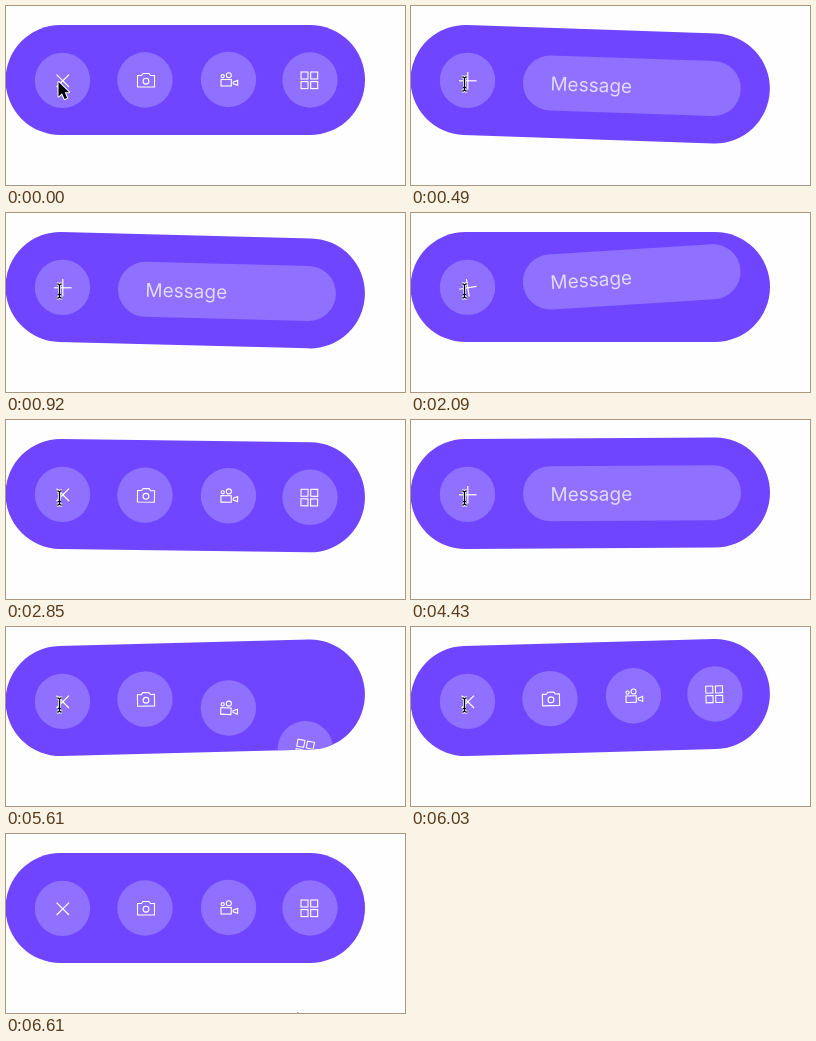
These frames come from a looping animation (399 by 179 pixels, 7030 ms). An HTML page with a canvas:

```html
<!DOCTYPE html>
<html lang="en">
<head>
<meta charset="utf-8">
<title>Swinging message bar</title>
<style>
html, body { margin: 0; width: 100%; height: 100%; overflow: hidden; background: #fefefe; }
canvas { display: block; width: 399px; height: 179px; }
</style>
</head>
<body>
<canvas id="stage"></canvas>
<script>
const W = 399, H = 179, LOOP = 7030;
const PIVOT = { x: 56, y: 74 };
const canvas = document.getElementById('stage');
const ctx = canvas.getContext('2d');
const dpr = window.devicePixelRatio || 1;
canvas.width = W * dpr;
canvas.height = H * dpr;

// Swing of the bar: [ms since click, degrees]
const HIT_DOWN = [[150, 0], [270, 5.1], [440, -3.8], [640, 1.5], [830, -1.1], [980, 0.25], [1100, 0]];
const HIT_UP = [[150, 0], [440, -5.5], [860, 1.2], [1010, -0.5], [1130, 0]];

const CLICKS = [
  { at: 290, menu: false },
  { at: 2060, menu: true },
  { at: 3670, menu: false },
  { at: 5360, menu: true }
];

const clamp = v => Math.max(0, Math.min(1, v));
const smooth = p => (1 - Math.cos(Math.PI * clamp(p))) / 2;

function swing(keys, t) {
  if (t <= keys[0][0]) return 0;
  for (let i = 1; i < keys.length; i++) {
    const [t0, a] = keys[i - 1], [t1, b] = keys[i];
    if (t < t1) return a + (b - a) * smooth((t - t0) / (t1 - t0));
  }
  return 0;
}

function turn(deg, draw, x = PIVOT.x, y = PIVOT.y) {
  ctx.save();
  ctx.translate(x, y);
  ctx.rotate(deg * Math.PI / 180);
  ctx.translate(-x, -y);
  draw();
  ctx.restore();
}

function pill(x, y, w, h) {
  ctx.beginPath();
  ctx.roundRect(x, y, w, h, h / 2);
}

function disc(x, y) {
  ctx.fillStyle = '#8f70ff';
  ctx.beginPath();
  ctx.arc(x, y, 27.7, 0, Math.PI * 2);
  ctx.fill();
}

function line(points, close) {
  ctx.beginPath();
  points.forEach(([x, y]) => ctx.lineTo(x, y));
  if (close) ctx.closePath();
  ctx.stroke();
}

function ring(x, y, r) {
  ctx.beginPath();
  ctx.arc(x, y, r, 0, Math.PI * 2);
  ctx.stroke();
}

function camera() {
  line([[131.5, 69.5], [135.5, 69.5], [137, 67.5], [143, 67.5], [144.5, 69.5],
        [148.5, 69.5], [148.5, 81], [131.5, 81]], true);
  ring(140, 75.2, 2.9);
}

function video() {
  ring(216.7, 70.2, 1.6);
  ring(222.8, 69.2, 2.5);
  ctx.strokeRect(215, 73.5, 10.3, 6.5);
  line([[227.3, 76], [231.7, 74.3], [231.7, 79.3], [227.3, 77.8]], true);
}

function grid() {
  for (const x of [295, 304.7])
    for (const y of [66, 75.6]) ctx.strokeRect(x, y, 7, 7);
}

const ITEMS = [
  { x: 139, y: 74, icon: camera, delay: 76 },
  { x: 222.5, y: 73.5, icon: video, delay: 125 },
  { x: 304, y: 74, icon: grid, delay: 159 }
];

function menuItem(item) {
  disc(item.x, item.y);
  ctx.strokeStyle = '#fff';
  ctx.lineWidth = 1.1;
  item.icon();
}

function messageField() {
  ctx.fillStyle = '#8f70ff';
  pill(112, 46.7, 218, 55);
  ctx.fill();
  ctx.fillStyle = '#e2daff';
  ctx.font = '19px Inter, "Open Sans", sans-serif';
  ctx.fillText('Message', 139.5, 81.5);
}

function arrow(x, y) {
  ctx.save();
  ctx.translate(x, y);
  ctx.beginPath();
  [[0.5, 0], [0.5, 14.5], [4, 11.3], [6.6, 17], [9.2, 15.9], [6.7, 10.3], [11, 10.3]]
    .forEach(([px, py]) => ctx.lineTo(px, py));
  ctx.closePath();
  ctx.lineJoin = 'round';
  ctx.strokeStyle = '#fff';
  ctx.lineWidth = 2;
  ctx.stroke();
  ctx.fillStyle = '#000';
  ctx.fill();
  ctx.restore();
}

function beam(x, y) {
  for (const [color, width] of [['#fff', 3], ['#000', 1.2]]) {
    ctx.strokeStyle = color;
    ctx.lineWidth = width;
    line([[x - 2.7, y - 7], [x - 1, y - 7], [x, y - 6], [x, y + 6], [x - 1, y + 7], [x - 2.7, y + 7]]);
    line([[x + 2.7, y - 7], [x + 1, y - 7], [x, y - 6], [x, y + 6], [x + 1, y + 7], [x + 2.7, y + 7]]);
    line([[x - 1.5, y + 3.5], [x + 1.5, y + 3.5]]);
  }
}

function cursor(t) {
  if (t >= 120 && t < 6060) return beam(53.5, 78);
  const p = t < 120 ? 0 : smooth((t - 6060) / 540);
  arrow(52 + 239 * p, 76 + 102 * p);
}

function draw(t) {
  const click = CLICKS.filter(c => c.at <= t).pop() || { at: -2000, menu: true };
  const s = t - click.at;
  const tilt = swing(click.menu ? HIT_UP : HIT_DOWN, s);

  ctx.setTransform(dpr, 0, 0, dpr, 0, 0);
  ctx.fillStyle = '#fefefe';
  ctx.fillRect(0, 0, W, H);

  turn(tilt, () => {
    ctx.fillStyle = '#7045ff';
    pill(-0.5, 19, 359.5, 110);
    ctx.fill();
    ctx.clip();

    const out = clamp(s / (click.menu ? 155 : 180));
    const fall = click.menu ? out * out : 1 - out * out;
    if (fall < 1) turn(-90 * fall, messageField);

    for (const item of ITEMS) {
      const drop = click.menu
        ? (1 - clamp((s - item.delay) / 200)) ** 3
        : clamp(s / 200) ** 2;
      if (drop < 1) turn(80 * drop, () => menuItem(item));
    }
  });

  disc(56.5, 74.4);
  const spin = clamp(s / 150);
  turn(-45 * (click.menu ? spin : 1 - spin), () => {
    ctx.strokeStyle = '#fff';
    ctx.lineWidth = 1.2;
    line([[48, 74.8], [65.6, 74.8]]);
    line([[56.8, 66], [56.8, 83.6]]);
  }, 56.8, 74.8);

  cursor(t);
}

const start = performance.now();
function frame() {
  draw((performance.now() - start) % LOOP);
  requestAnimationFrame(frame);
}
frame();
</script>
</body>
</html>
```
